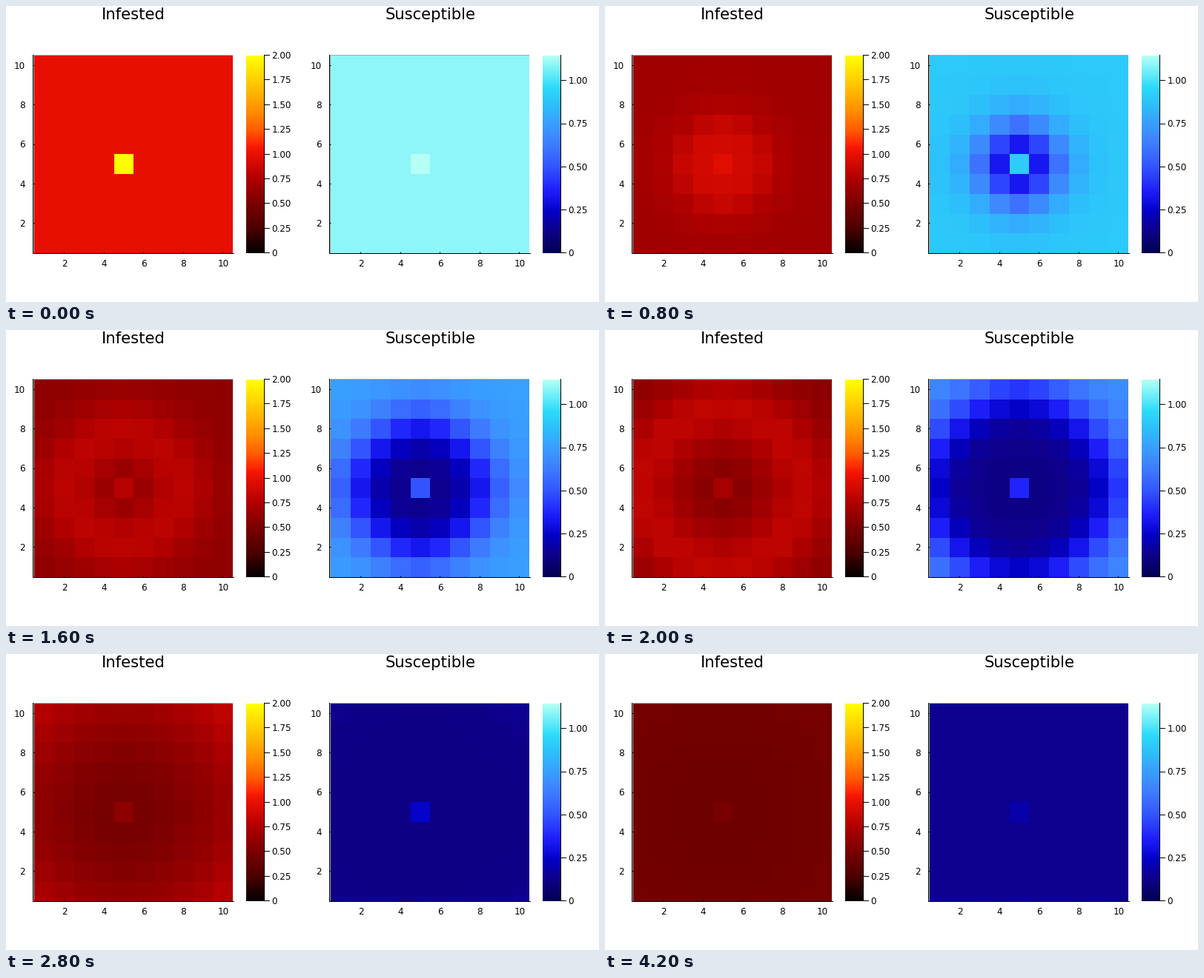
Recreate the animation shown at these times as a matplotlib script. Size 800 by 400 pixels, loop 8000 ms.

```python
import numpy as np
import matplotlib.pyplot as plt
from matplotlib.animation import FuncAnimation
from matplotlib.colors import LinearSegmentedColormap, to_rgb

PX = 0.72  # points per pixel at 100 dpi
INK, EDGE = "black", "#a8a8a8"
I_TOP, S_TOP = 2.0, 1.147
STEPS, SETTLED = 80, 42
plt.rcParams["font.family"] = "DejaVu Sans"


def lightness(color):
    luminance = np.array(to_rgb(color)) ** 2.2 @ [.2126, .7152, .0722]
    if luminance < .008856:
        return 903.3 * luminance
    return 116 * np.cbrt(luminance) - 16


def even_cmap(name, colors):
    """Colormap whose lightness rises evenly through the given colours."""
    light = np.array([lightness(c) for c in colors])
    places = (light - light[0]) / (light[-1] - light[0])
    return LinearSegmentedColormap.from_list(
        name, list(zip(places, colors)), N=512)


FIRE = even_cmap("fire", [
    "#000000", "#490000", "#7a0000", "#ae0000", "#e71000", "#f61500",
    "#ff3300", "#ff5b00", "#ff8500", "#ffb000", "#ffd700", "#ffff00"])
ICE = even_cmap("ice", [
    "#00004e", "#0e008b", "#0300c3", "#0f0fe2", "#1e1efa", "#3253ff",
    "#3c73ff", "#3e87ff", "#37a5ff", "#2dbefa", "#2cdafa", "#8cf6f8",
    "#b6fff5"])

offset = np.abs(np.arange(1, 11) - 5.0)
DISTANCE = (offset[:, None] ** 1.7 + offset ** 1.7) ** (1 / 1.7)


def susceptible_at(t):
    """A front runs outwards and leaves a low floor; the seed cell lags."""
    floor = .115 + .022 * np.clip((t - 24) / 18, 0, 1)
    ahead = 1.094 / (1 + .027 * t)
    front = .9 * (np.exp(.0854 * t) - np.exp(-t / 4))
    width = .05 + .7 * (1 - np.exp(-t / 3))
    wave = (1 + np.tanh((DISTANCE - front) / (2 * width))) / 2
    seed = floor + (S_TOP - floor) / (1 + (t / 13) ** 2.5)
    return np.where(DISTANCE == 0, seed, floor + (ahead - floor) * wave)


def infested_series(susceptible):
    """Losses of the susceptible feed the infested, which die off."""
    grid = np.where(DISTANCE == 0, 2.0, 1.0)
    series = [grid]
    for before, after in zip(susceptible, susceptible[1:]):
        deaths = .13 * grid * np.minimum(grid, 1)
        grid = grid - deaths + (before - after) + .025
        series.append(grid)
    return series


SUSCEPTIBLE = [susceptible_at(t) for t in range(SETTLED + 1)]
INFESTED = infested_series(SUSCEPTIBLE)

fig = plt.figure(figsize=(8, 4), dpi=100, facecolor="white")
ax = fig.add_axes([0, 0, 1, 1])


def line(x0, y0, x1, y1, color=INK):
    ax.plot([x0, x1], [y0, y1], color=color, lw=PX, solid_capstyle="butt",
            snap=False)


def pixel(v):
    return np.floor(v) + .5


def label(x, y, text, ha="center", size=12):
    """Place text with its capitals centred on y."""
    ax.text(x, y + 0.365 * size, text, ha=ha, va="baseline",
            fontsize=size * PX, color=INK)


def panel(left, title, cmap, top, ticks):
    x_edges = np.round(left + 38.4 + 26.78 * np.arange(11))
    y_edges = np.round(334 - 26.72 * np.arange(11))
    style = dict(cmap=cmap, vmin=0, vmax=top, antialiased=False, linewidth=0)
    mesh = ax.pcolormesh(x_edges, y_edges, np.zeros((10, 10)), **style)
    label(left + 172.3, 10.4, title, size=21.2)

    line(left + 37, 66.5, left + 306, 66.5, EDGE)
    line(left + 37.5, 66, left + 37.5, 334, EDGE)
    line(left + 36.5, 66, left + 36.5, 335)
    line(left + 36, 334.5, left + 308, 334.5)
    for v in range(2, 11, 2):
        x, y = left + 38.4 + 26.78 * (v - .5), 334 - 26.72 * (v - .5)
        line(left + 36, pixel(y), left + 38.5, pixel(y))
        line(pixel(x), 335, pixel(x), 332.5)
        label(left + 26, y, str(v), ha="right")
        label(x, 348, str(v))

    ramp = (np.arange(256) + .5)[:, None] / 256 * top
    ax.pcolormesh([left + 324, left + 348], np.linspace(334, 66.5, 257), ramp,
                  **style)
    line(left + 348.5, 66, left + 348.5, 334)
    for v in ticks:
        y = 333.8 - 267.3 * v / top
        line(left + 348, pixel(y), left + 356, pixel(y))
        label(left + 358.5, y, f"{v:.2f}" if v else "0", ha="left")
    return mesh


infested = panel(0, "Infested", FIRE, I_TOP, np.arange(0, 2.01, .25))
susceptible = panel(400, "Susceptible", ICE, S_TOP, np.arange(0, 1.01, .25))
ax.set_xlim(0, 800)
ax.set_ylim(400, 0)
ax.axis("off")


def update(step):
    t = min(step, SETTLED)
    infested.set_array(INFESTED[t])
    susceptible.set_array(SUSCEPTIBLE[t])
    return infested, susceptible


anim = FuncAnimation(fig, update, frames=STEPS, interval=100, repeat=True,
                     repeat_delay=0, blit=False)
plt.show()
```
